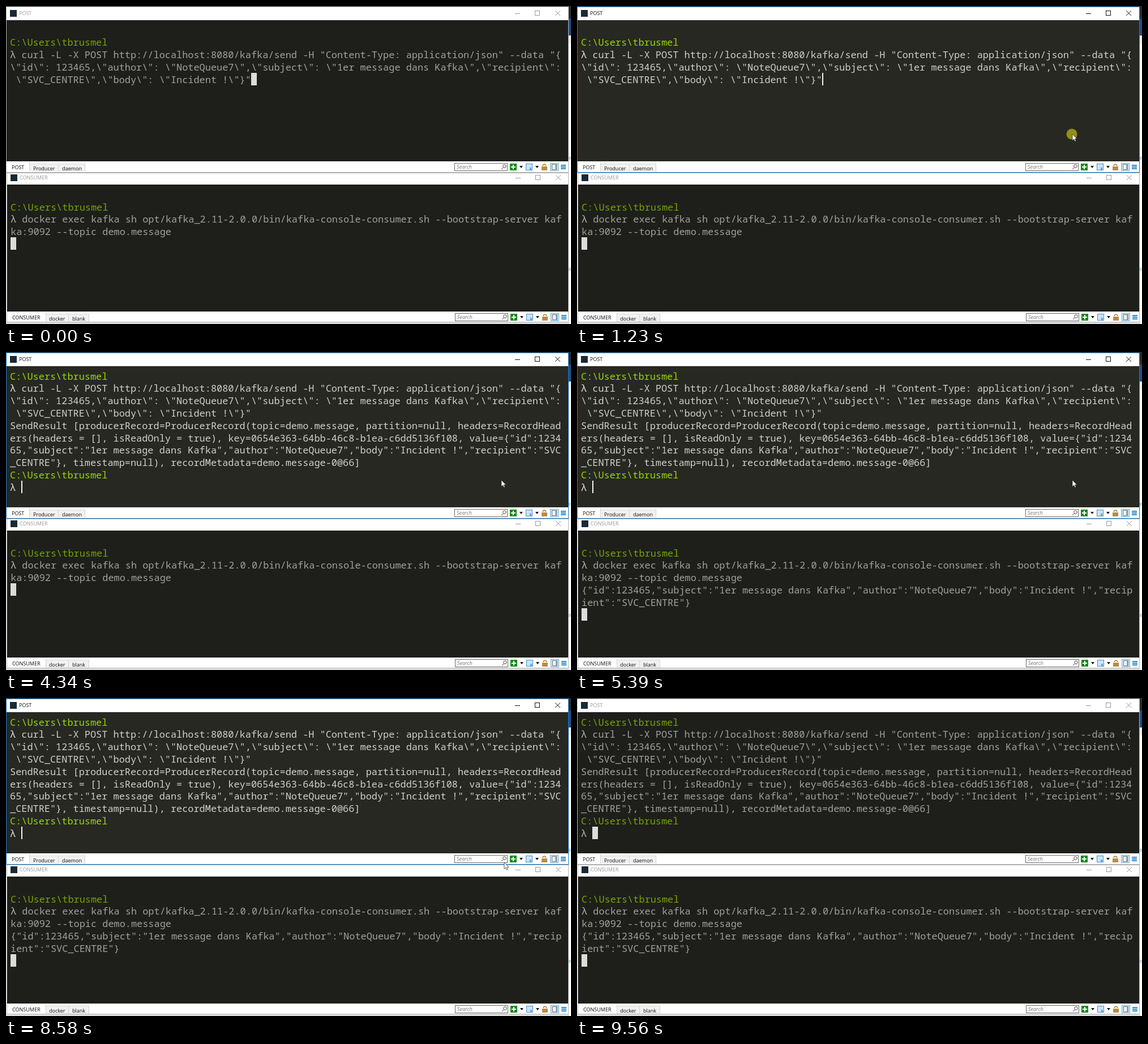
An HTML page with a canvas for the animation above (9610 ms loop, 998 by 561 pixels).

```html
<!DOCTYPE html>
<html lang="fr">
<head>
<meta charset="utf-8">
<title>Terminal demo</title>
<style>
html, body { margin: 0; width: 100%; height: 100%; overflow: hidden; background: #fff; }
canvas { display: block; }
</style>
</head>
<body>
<canvas id="stage" width="998" height="561"></canvas>
<script>
const ctx = document.getElementById('stage').getContext('2d');
const LOOP = 9610, STEP = 50;
const CELL = 10.14, ROW = 21.8;
const MONO = '16.9px "Noto Sans Mono", "DejaVu Sans Mono", monospace';
const UI = '9px "Open Sans", sans-serif';
const BRIGHT = { back: '#272822', text: '#d0d0cc', prompt: '#98d800', lambda: '#e4e4e0', ui: '#111' };
const DIM = { back: '#1e1f1b', text: '#a0a09d', prompt: '#76a500', lambda: '#b4b4b1', ui: '#999' };

// Moments of the story, in ms
const ENTER = 490, CLICK = 1180, FOCUS = 1230, RELEASE = 1380;
const SEND = 4240, REPLY = 4340, RECEIVE = 4650;
const NUDGE = 8040, LEAVE = 8320, GONE = 9240, BLUR = 9560;
const BLINK = 530;

const wrap = text => text.match(/.{1,96}/g);
const prompt = String.raw`C:\Users\tbrusmel`;
const json = '{"id":123465,"subject":"1er message dans Kafka","author":"NoteQueue7","body":"Incident !","recipient":"SVC_CENTRE"}';
const curl = wrap(String.raw`λ curl -L -X POST http://localhost:8080/kafka/send -H "Content-Type: application/json" --data "{\"id\": 123465,\"author\": \"NoteQueue7\",\"subject\": \"1er message dans Kafka\",\"recipient\": \"SVC_CENTRE\",\"body\": \"Incident !\"}"`);
const reply = wrap(`SendResult [producerRecord=ProducerRecord(topic=demo.message, partition=null, headers=RecordHeaders(headers = [], isReadOnly = true), key=0654e363-64bb-46c8-b1ea-c6dd5136f108, value=${json}, timestamp=null), recordMetadata=demo.message-0@66]`);
const docker = wrap('λ docker exec kafka sh opt/kafka_2.11-2.0.0/bin/kafka-console-consumer.sh --bootstrap-server kafka:9092 --topic demo.message');

function rect(x, y, w, h, color) {
  ctx.fillStyle = color;
  ctx.fillRect(x, y, w, h);
}

function frame(x, y, w, h, color) {
  ctx.strokeStyle = color;
  ctx.lineWidth = 1;
  ctx.strokeRect(x + 0.5, y + 0.5, w - 1, h - 1);
}

function path(points, color, filled) {
  ctx.beginPath();
  points.forEach(([x, y]) => ctx.lineTo(x, y));
  ctx.fillStyle = ctx.strokeStyle = color;
  if (filled) ctx.fill(); else ctx.stroke();
}

function label(text, x, y, color, font = UI) {
  ctx.font = font;
  ctx.fillStyle = color;
  ctx.fillText(text, x, y);
}

function terminalText(rows, x, top, theme) {
  ctx.font = MONO;
  rows.forEach((row, r) => {
    const y = Math.round(top + r * ROW + 17.5);
    [...row].forEach((char, c) => {
      ctx.fillStyle = char === 'λ' ? theme.lambda : row === prompt ? theme.prompt : theme.text;
      ctx.fillText(char, x + c * CELL, y);
    });
  });
}

function caret(x, top, row, col, thin) {
  const y = Math.round(top + row * ROW);
  rect(Math.round(x + col * CELL), y, thin ? 2 : 10, 22, thin ? '#f4f4f0' : '#dcdcda');
}

function titleBar(x, y, title, theme) {
  rect(x, y - 12, 993, 24, '#fff');
  rect(x + 7, y - 6, 12, 12, '#182a36');
  label(title, x + 23, y + 3, theme.ui);
  ctx.lineWidth = 1;
  rect(x + 899, y, 9, 1, theme.ui);
  frame(x + 934, y - 5, 9, 9, theme.ui);
  path([[x + 970, y - 4.5], [x + 979, y + 4]], theme.ui);
  path([[x + 979, y - 4.5], [x + 970, y + 4]], theme.ui);
}

function toolbar(x, y) {
  frame(x + 792, y - 7, 94, 14, '#6a6a6a');
  label('Search', x + 796, y + 3, '#777', 'italic ' + UI);
  ctx.beginPath();
  ctx.arc(x + 880.5, y - 1.5, 2.8, 0, Math.PI * 2);
  ctx.strokeStyle = '#444';
  ctx.stroke();
  path([[x + 878.5, y + 1], [x + 875, y + 4]], '#444');

  rect(x + 890, y - 6, 12, 12, '#16891c');
  rect(x + 895, y - 4, 2, 8, '#fff');
  rect(x + 892, y - 1, 8, 2, '#fff');
  for (const ax of [907, 935]) {
    path([[x + ax, y - 2], [x + ax + 6, y - 2], [x + ax + 3, y + 2]], '#111', true);
  }
  rect(x + 918, y - 6, 12, 12, '#c9e4f8');
  frame(x + 918, y - 6, 12, 12, '#4a90c8');
  rect(x + 925, y + 1, 3, 4, '#5fa6dc');

  rect(x + 946, y - 1, 10, 7, '#b98d42');
  ctx.beginPath();
  ctx.arc(x + 951, y - 2, 2.8, Math.PI, 0);
  ctx.strokeStyle = '#a27a35';
  ctx.lineWidth = 1.5;
  ctx.stroke();

  rect(x + 961, y - 7, 15, 14, '#cfe8fa');
  frame(x + 961, y - 7, 15, 14, '#68aee0');
  rect(x + 964, y - 5, 9, 10, '#f2f2f2');
  frame(x + 964, y - 5, 9, 10, '#777');
  rect(x + 970, y - 4, 2, 8, '#aaa');
  for (const dy of [-4, -1, 2]) rect(x + 980, y + dy, 9, 2, '#2e86c4');
}

// Tabs: [name, text x, right edge]; the first one is active
function tabBar(x, y, height, tabs) {
  rect(x, y - 10, 993, height, '#fff');
  let left = x + 2;
  tabs.forEach(([name, textX, right], i) => {
    if (i) {
      rect(left, y - 6, x + right - left, 14, '#f1f1f1');
      rect(left, y - 6, x + right - left, 1, '#dcdcdc');
    }
    rect(x + right, y - (i ? 6 : 9), 1, i ? 14 : 17, '#d5d5d5');
    label(name, x + textX, y + (i ? 6 : 4), '#111');
    left = x + right + 1;
  });
  toolbar(x, y);
}

function desktop() {
  rect(0, 0, 998, 561, '#fff');
  rect(0, 0, 998, 22, '#2b2c2e');
  rect(993, 22, 5, 30, '#1c4e8a');
  rect(993, 52, 5, 14, '#ececec');
  label('e', 993, 271, '#5aa5bb');
  label('e', 993, 467, '#5aa5bb');
}

function producer(t, focused) {
  const theme = focused ? BRIGHT : DIM;
  titleBar(0, 13, 'POST', theme);
  rect(1, 25, 992, 249, theme.back);
  tabBar(0, 284, 19, [['POST', 10, 41], ['Producer', 48, 92], ['daemon', 99, 139]]);
  frame(0, 1, 994, 293, focused ? '#1a78c2' : '#b5b5b5');

  const replied = t >= REPLY;
  const rows = replied ? [prompt, ...curl, ...reply, prompt, 'λ'] : ['', prompt, ...curl];
  terminalText(rows, 7, 31, theme);

  const since = t >= REPLY ? t - REPLY : t >= SEND ? 0 : t - FOCUS;
  if (focused && Math.floor((since + 10) / BLINK) % 2) return;
  const [row, col] = replied ? [9, 2] : t >= SEND ? [5, 0] : [4, 42];
  caret(7, 31, row, col, focused);
}

function consumer(t) {
  const received = t >= RECEIVE;
  titleBar(1, 303, 'CONSUMER', DIM);
  rect(2, 315, 991, 224, DIM.back);
  tabBar(1, 549, 19, [['CONSUMER', 10, 69], ['docker', 75, 109], ['blank', 116, 145]]);
  frame(1, 294, 993, 264, '#b5b5b5');
  rect(0, 558, 995, 3, '#dedede');
  rect(1, 293, 993, 2, '#a9a9a9');
  terminalText([prompt, ...docker, ...(received ? wrap(json) : [])], 8, 343, DIM);
  caret(8, 343, received ? 5 : 3, 0, false);
}

function pointerAt(t) {
  const ease = p => p * p * (3 - 2 * p);
  const between = (from, to) => ease(Math.min(1, (t - from) / (to - from)));
  if (t < ENTER || t >= GONE) return null;
  if (t < NUDGE) {
    const p = between(ENTER, CLICK);
    return [905 - 30 * p, 562 - 336 * p];
  }
  const p = t < LEAVE ? 0 : between(LEAVE, GONE);
  return [875 + 25 * p, 224 + 338 * p];
}

function pointer(t) {
  const spot = pointerAt(t);
  if (!spot) return;
  const [x, y] = spot.map(Math.round);
  if (t >= CLICK && t < RELEASE) {
    ctx.beginPath();
    ctx.arc(x - 1, y, 9.5, 0, Math.PI * 2);
    ctx.fillStyle = '#938e14';
    ctx.fill();
  }
  const arrow = [[0, 0], [0, 11.5], [2.7, 9], [4.5, 13], [6.3, 12.2], [4.6, 8.2], [8, 8.2], [0, 0]];
  const shape = arrow.map(([ax, ay]) => [x + ax, y + ay]);
  path(shape, '#fff', true);
  ctx.lineWidth = 0.7;
  path(shape, '#222');
}

function draw(t) {
  const focused = t >= FOCUS && t < BLUR;
  ctx.lineWidth = 1;
  desktop();
  consumer(t);
  producer(t, focused);
  pointer(t);
}

const start = performance.now();
let shown = -1;
function tick() {
  const t = Math.floor(((performance.now() - start) % LOOP) / 10) * 10;
  if (t !== shown) draw(shown = t);
  requestAnimationFrame(tick);
}
draw(0);
requestAnimationFrame(tick);
</script>
</body>
</html>
```
